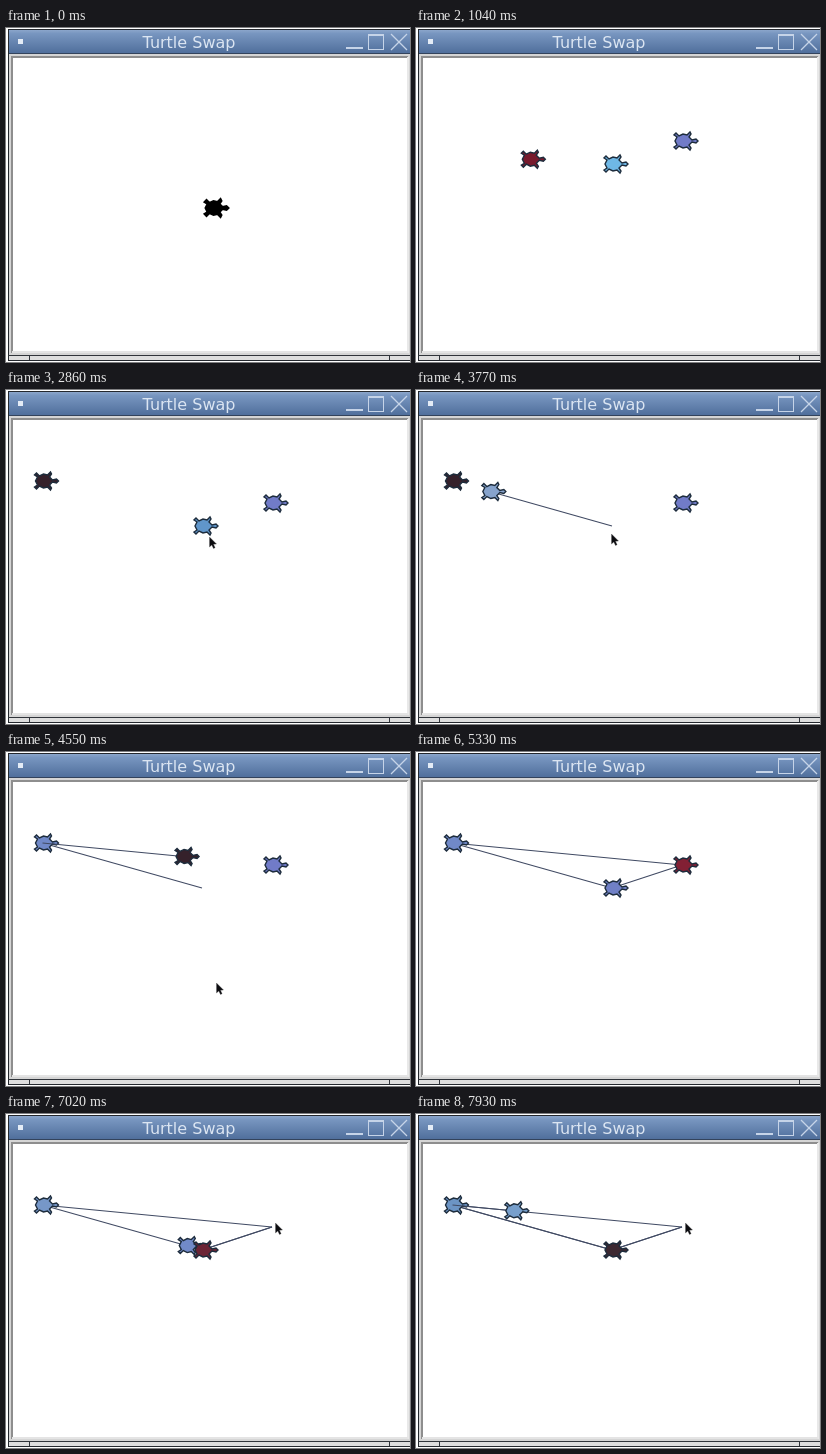
An HTML page with a canvas that plays this animation: 404 by 334 pixels, repeating every 8000 ms.

```html
<!DOCTYPE html>
<html lang="en">
<head>
<meta charset="utf-8">
<title>Turtle Swap</title>
<style>
html, body { margin: 0; width: 404px; height: 334px; overflow: hidden; background: #fff; }
canvas { position: absolute; left: 0; top: 0; }
#title {
  position: absolute; left: 83px; width: 200px; top: 4px; line-height: 21px;
  text-align: center; white-space: nowrap; color: #dbe5f2;
  font-family: "DejaVu Sans", sans-serif; font-size: 16px;
}
</style>
</head>
<body>
<canvas id="stage" width="404" height="334"></canvas>
<div id="title">Turtle Swap</div>
<script>
const g = document.getElementById("stage").getContext("2d");
const LOOP = 8000, STEP = 130, SPEED = 30 / STEP;

// Home spots and the start point
const O = [206.5, 180], A = [36.5, 91], B = [196, 136], C = [266, 113];

// Each run plays its moves one after another: [turtle, from, to]
const runs = [
  { at: 0, pen: false, moves: [[0, O, C], [1, O, B], [2, O, A]] },
  { at: 3220, pen: true, moves: [[1, B, A], [2, A, C], [0, C, B]] },
  { at: 6630, pen: true, moves: [[2, C, B], [0, B, A], [1, A, C]] }
];

// Fill colours per turtle: [from time, colour]
const fills = [
  [[0, "#000"], [130, "#717bc8"], [4900, "#7080c6"], [6890, "#718ac8"], [7670, "#6c94c4"]],
  [[0, "#6fb8e6"], [1560, "#6096cb"], [3250, "#86a3cc"], [4030, "#7089c8"], [6760, "#7697c8"], [7670, "#779fcc"]],
  [[0, "#771a2d"], [1560, "#35212b"], [4940, "#822034"], [6760, "#6c2435"], [7540, "#3c2831"]]
];

// Pointer paths: [time, x, y]
const pointers = [
  [[2340, 226, 300], [2860, 203, 147], [3250, 195, 144], [4160, 195, 144], [4940, 225, 318]],
  [[5980, 310, 300], [6500, 269, 109], [8000, 269, 109]]
];

// Right half of the shape, facing east: [along, across]
const half = [[16, 0], [14, 2], [10, 1], [7, 4], [9, 7], [8, 9], [5, 6], [1, 7],
  [-3, 5], [-6, 8], [-8, 6], [-5, 4], [-7, 0]];
const shell = half.concat(half.slice(1, -1).reverse().map(([x, y]) => [x, -y]));

const mix = (a, b, k) => a + (b - a) * k;
const between = (p, q, k) => [mix(p[0], q[0], k), mix(p[1], q[1], k)];

function rect(color, x, y, w, h) {
  g.fillStyle = color;
  g.fillRect(x, y, w, h);
}

function line(color, width, ...pts) {
  g.strokeStyle = color;
  g.lineWidth = width;
  g.beginPath();
  pts.forEach(p => g.lineTo(p[0], p[1]));
  g.stroke();
}

function polygon(pts, x, y, fill, edge, width) {
  g.beginPath();
  pts.forEach(p => g.lineTo(x + p[0], y + p[1]));
  g.closePath();
  g.fillStyle = fill;
  g.fill();
  g.strokeStyle = edge;
  g.lineWidth = width;
  g.stroke();
}

function drawWindow() {
  rect("#fff", 0, 0, 404, 334);
  rect("#24282e", 2, 1, 402, 332);
  const bar = g.createLinearGradient(0, 2, 0, 25);
  bar.addColorStop(0, "#8ba6cb");
  bar.addColorStop(0.15, "#7896c0");
  bar.addColorStop(1, "#506f9c");
  rect(bar, 3, 2, 401, 23);
  rect("#33435c", 3, 25, 401, 1);
  rect("#d5d5d5", 3, 26, 401, 301);
  rect("#8e8e8e", 5, 28, 397, 297);
  rect("#fff", 7, 30, 394, 293);
  rect("#e8e8e8", 401, 29, 2, 296);
  rect("#e4e4e4", 6, 323, 396, 2);
  rect("#30343a", 2, 327, 402, 1);
  rect("#dedede", 3, 328, 401, 4);
  rect("#30343a", 23, 327, 1, 5);
  rect("#30343a", 383, 327, 1, 5);

  const ink = "#c6d4e8";
  rect("#e4ecf6", 12, 11, 5, 5);
  rect(ink, 340, 19, 17, 2);
  g.strokeStyle = ink;
  g.lineWidth = 1;
  g.strokeRect(362.5, 6.5, 15, 15);
  line(ink, 1, [362, 7.5], [378, 7.5]);
  line(ink, 1.2, [385, 6], [401, 22]);
  line(ink, 1.2, [401, 6], [385, 22]);
}

function drawTurtles(t) {
  const pos = [O, null, null], trails = [], active = [];
  for (const run of runs) {
    let left = (t - run.at) * SPEED;
    for (const [who, from, to] of run.moves) {
      if (left <= 0) break;
      const len = Math.hypot(to[0] - from[0], to[1] - from[1]);
      pos[who] = between(from, to, Math.min(1, left / len));
      if (run.pen) {
        if (left < len) active[who] = from;
        else trails.push([from, to]);
      }
      left -= len;
    }
  }
  const pen = "#404a63";
  trails.forEach(([p, q]) => line(pen, 1.1, p, q));
  pos.forEach((p, i) => {
    if (!p) return;
    if (active[i]) line(pen, 1.1, active[i], p);
    const fill = fills[i].filter(k => k[0] <= t).pop()[1];
    polygon(shell, p[0], p[1], fill, t < STEP ? "#000" : "#1d2c3c", t < STEP ? 2 : 1.4);
  });
}

function drawPointer(t) {
  for (const path of pointers) {
    const i = path.findIndex(k => k[0] > t);
    if (i < 1) continue;
    const a = path[i - 1], b = path[i], k = (t - a[0]) / (b[0] - a[0]);
    polygon([[0, 0], [0, 10], [2.3, 8], [4, 11.5], [5.6, 10.7], [4, 7.3], [7, 7]],
      mix(a[1], b[1], k) + 0.5, mix(a[2], b[2], k), "#0c0c10", "#555a", 0.5);
  }
}

function frame(now) {
  const t = Math.floor((now % LOOP) / STEP) * STEP;
  drawWindow();
  drawTurtles(t);
  drawPointer(t);
}

const start = performance.now();
function tick() {
  frame(Math.max(0, performance.now() - start));
  requestAnimationFrame(tick);
}
tick();
</script>
</body>
</html>
```
